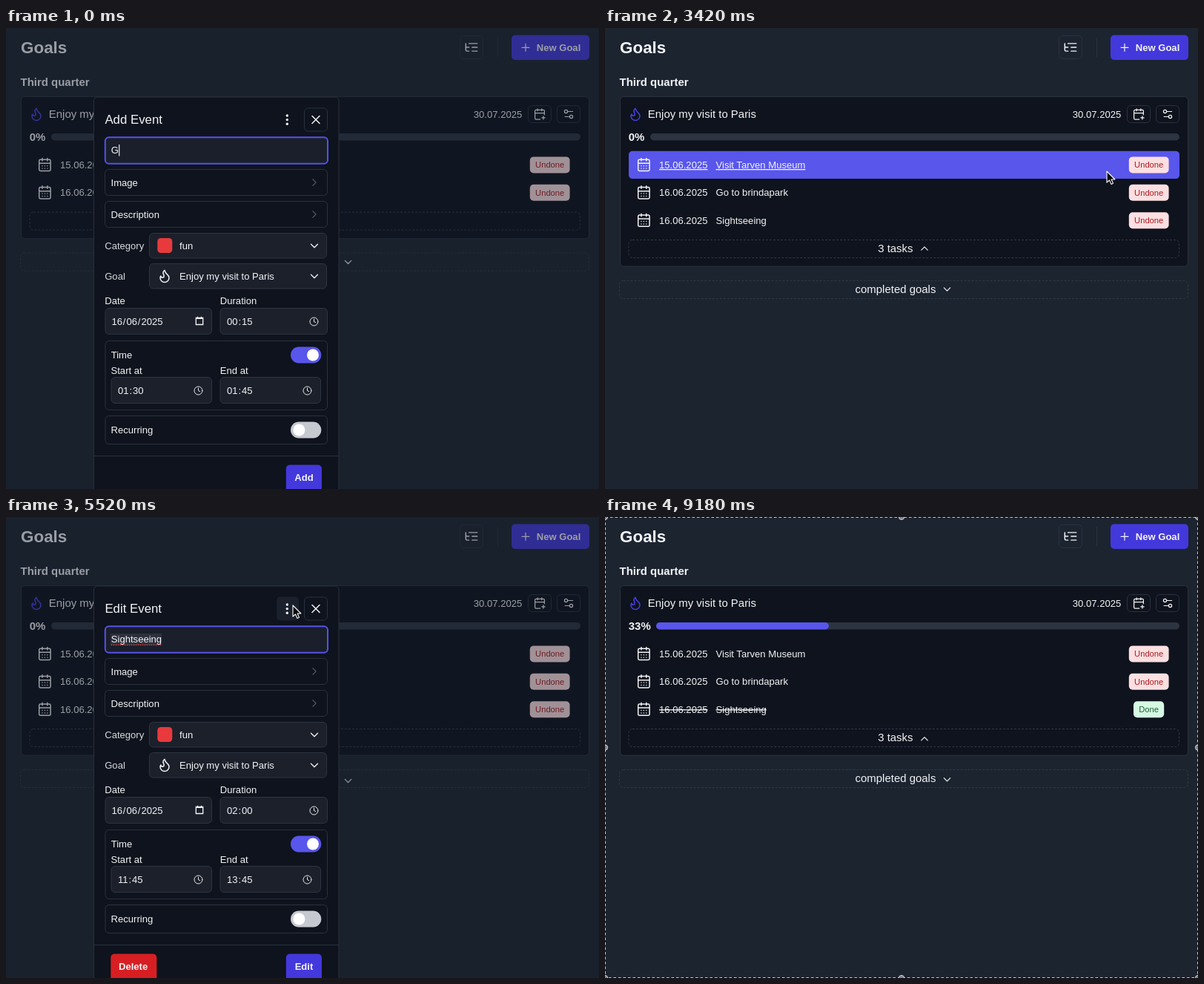
Write an HTML page that moves like this. It is 800 px wide and 621 px high and loops after 9240 ms.

```html
<!DOCTYPE html>
<html lang="en">
<head>
<meta charset="utf-8">
<title>Goals</title>
<style>
  html, body { margin: 0; width: 100%; height: 100%; overflow: hidden; background: #1c2430; }
  svg { display: block; }
  text { font: 13.08px "Liberation Sans", Arial, sans-serif; fill: #f3f4f6; white-space: pre; }
  .h1 { font-size: 22.43px; font-weight: 700; }
  .h2 { font-size: 16.82px; }
  .lg { font-size: 14.95px; }
  .sm { font-size: 11.21px; text-anchor: middle; }
  .b { font-weight: 700; }
  .mid { text-anchor: middle; }
  .soft { fill: #d6d9de; }
  .icon { fill: none; stroke: #f3f4f6; stroke-width: 1.75; stroke-linecap: round; stroke-linejoin: round; }
  .line { fill: none; stroke: #2b323e; }
  .dash { fill: none; stroke: #303845; stroke-dasharray: 3 2; }
  .field { fill: #1b202b; stroke: #2e3541; }
  .hover .label { text-decoration: underline; }
  .done .label { text-decoration: line-through; }
  .row .bg { fill: none; }
  .row.hover .bg { fill: #5856eb; }
</style>
</head>
<body>
<svg id="stage" width="800" height="621" viewBox="0 0 800 621"></svg>
<script>
const LOOP = 9240, STEP = 60, ROW = 37.4;
const INDIGO = '#5856eb', BUTTON = '#4338dc', PANEL = '#0e131d';
const TYPED = 'Go to brindapark';

const ICONS = {
  tree: 'M21 12h-8M21 6H8M21 18h-8M3 6v4c0 1.1.9 2 2 2h3M3 10v6c0 1.1.9 2 2 2h3',
  plus: 'M5 12h14M12 5v14',
  close: 'M18 6 6 18M6 6l12 12',
  flame: 'M8.5 14.5A2.5 2.5 0 0 0 11 12c0-1.38-.5-2-1-3-1.07-2.14-.22-4.05 2-6 .5 2.5 2 4.9 4 6.5s3 3.5 3 5.5a7 7 0 1 1-14 0c0-1.15.43-2.29 1-3a2.5 2.5 0 0 0 2.5 2.5z',
  calendar: 'M8 2v4M16 2v4M3 10h18M5 4h14a2 2 0 0 1 2 2v14a2 2 0 0 1-2 2H5a2 2 0 0 1-2-2V6a2 2 0 0 1 2-2zM8 14h.01M12 14h.01M16 14h.01M8 18h.01M12 18h.01M16 18h.01',
  calendarPlus: 'M8 2v4M16 2v4M21 13V6a2 2 0 0 0-2-2H5a2 2 0 0 0-2 2v14a2 2 0 0 0 2 2h8M3 10h18M16 19h6M19 16v6',
  sliders: 'M20 7h-9M14 17H5M20 17a3 3 0 1 1-6 0a3 3 0 1 1 6 0M10 7a3 3 0 1 1-6 0a3 3 0 1 1 6 0',
  up: 'm18 15-6-6-6 6',
  down: 'm6 9 6 6 6-6',
  right: 'm9 18 6-6-6-6',
  clock: 'M22 12a10 10 0 1 1-20 0a10 10 0 1 1 20 0M12 6v6l4 2'
};

// Markup helpers
const icon = (name, cx, cy, size, attrs = '') =>
  `<path class="icon" d="${ICONS[name]}" transform="translate(${cx - size / 2} ${cy - size / 2}) scale(${size / 24})" ${attrs}/>`;
const text = (x, y, str, cls = '', attrs = '') => `<text x="${x}" y="${y}" class="${cls}" ${attrs}>${str}</text>`;
const rect = (x, y, w, h, attrs = '', r = 5) => `<rect x="${x}" y="${y}" width="${w}" height="${h}" rx="${r}" ${attrs}/>`;
const box = (x, y, w, h, cls = 'line') => rect(x, y, w, h, `class="${cls}"`);
const fill = color => `fill="${color}"`;
const badge = (x, w, bg, ink, label, cls) =>
  `<g class="${cls}">${rect(x, 173.4, w, 22, fill(bg))}${text(x + w / 2, 188.3, label, 'sm', `style="fill:${ink}"`)}</g>`;

const row = (id, date, name) => `<g id="${id}" class="row">
  ${rect(32, 165.7, 743, ROW, 'class="bg"')}
  ${icon('calendar', 52.4, 184, 20.5)}
  ${text(73, 189, date, 'label')}${text(149.5, 189, name, 'label')}
  ${badge(706.8, 53.8, '#fcdfe1', '#a91c20', 'Undone', 'undone')}
  ${badge(713, 41.2, '#d5fae3', '#22603a', 'Done', 'finished')}
</g>`;

const page = `
  ${text(20, 33.7, 'Goals', 'h1')}
  ${box(612.5, 10.5, 31, 31)}${icon('tree', 628, 26, 20.5)}
  <path class="line" d="M663.5 13v26"/>
  ${rect(682, 9.5, 105, 33.5, fill(BUTTON))}${icon('plus', 701, 26.3, 17)}
  ${text(715.7, 31, 'New Goal', 'b')}
  ${text(19.6, 77.5, 'Third quarter', 'lg b')}
  <rect id="card" x="20.5" y="92.5" width="766" rx="5" fill="${PANEL}" stroke="#2b323e"/>
  ${icon('flame', 41, 116, 20.5, 'style="stroke:#4a40e4"')}
  ${text(57.8, 120.6, 'Enjoy my visit to Paris', 'lg')}
  ${text(630.8, 120.6, '30.07.2025')}
  ${box(704.5, 104.5, 31, 23)}${icon('calendarPlus', 720, 116, 17)}
  ${box(743.5, 104.5, 31, 23)}${icon('sliders', 759, 116, 16.8)}
  ${text(31.8, 151.6, '0%', 'lg b', 'id="percent"')}
  <rect id="track" y="142" height="9.4" rx="4.7" fill="#2d3441"/>
  <rect id="progress" x="69" y="142" height="9.4" rx="4.7" fill="${INDIGO}"/>
  ${row('visit', '15.06.2025', 'Visit Tarven Museum')}
  ${row('trip', '16.06.2025', TYPED)}
  ${row('sights', '16.06.2025', 'Sightseeing')}
  <g id="footer">
    ${box(32, 285.5, 742.5, 24, 'dash')}
    ${text(368.2, 302, '', 'lg', 'id="count"')}
    <g class="bounce">${icon('up', 431, 297, 16.8)}</g>
    ${box(19.5, 340.5, 767, 24, 'dash')}
    ${text(337.6, 357, 'completed goals', 'lg')}
    <g class="bounce">${icon('down', 461.5, 352, 16.8)}</g>
  </g>`;

const expander = (y, label) =>
  box(133.5, y, 300, 35) + text(141.5, y + 22.4, label) + icon('right', 416, y + 17.5, 16.8, 'style="stroke:#4d5461"');
const select = (y, label, value) =>
  text(133.2, y + 21, label, 'soft') + box(193.5, y, 239, 33.5, 'field') + text(234, y + 21, value) + icon('down', 416, y + 17, 18);
const timeField = (x, y, w, id) =>
  box(x, y, w, 35, 'field') + text(x + 9, y + 22.5, '', '', `id="${id}" dx="0 0 .9 .9"`) + icon('clock', x + w - 18, y + 18, 13.2, 'stroke-width="2.4"');
const toggle = (y, knob, color) =>
  rect(384, y, 41.3, 22, fill(color), 11) + `<circle cx="${knob}" cy="${y + 11}" r="8" fill="#fff"/>`;

const dialog = `
  <rect width="800" height="621" fill="#161d28" opacity=".4"/>
  <path d="M118.5 640V98a5 5 0 0 1 5-5H444a5 5 0 0 1 5 5V640z" fill="${PANEL}" stroke="#2b313c"/>
  ${text(133.4, 129, '', 'h2', 'id="heading"')}
  ${rect(365, 107.5, 30, 32, 'id="menu" fill="#1a212d"')}
  ${[118, 123.6, 129.2].map(y => `<circle cx="379.3" cy="${y}" r="1.7" fill="#f3f4f6"/>`).join('')}
  ${box(402.5, 108, 31, 31)}${icon('close', 418, 123.6, 20)}
  ${rect(133.8, 147.2, 300.2, 35.6, 'fill="#1a1f2b" stroke="#5552e8" stroke-width="2"')}
  <g id="selection">
    ${rect(141, 157, 69, 15.5, fill('#2c313c'), 0)}
    <path d="M142.5 172.3H210" stroke="#e0353a" stroke-width="1.8" stroke-dasharray="0 3" stroke-linecap="round"/>
  </g>
  ${text(141.8, 169.4, '', '', 'id="entry"')}
  ${rect(0, 157, 1.1, 15.5, 'id="caret" fill="#fff"', 0)}
  ${expander(190.5, 'Image')}${expander(233.5, 'Description')}
  ${select(276.5, 'Category', 'fun')}${rect(204.3, 283, 20, 20, fill('#e83a3c'), 4.5)}
  ${select(317.5, 'Goal', 'Enjoy my visit to Paris')}${icon('flame', 214, 334, 20.5)}
  ${text(133.2, 372.4, 'Date')}${text(288.8, 372.4, 'Duration')}
  ${box(134, 377.5, 143.5, 35, 'field')}
  ${text(142.4, 399.6, '16/06/2025', '', 'dx="0 0 .9 .9 0 .9 .9"')}
  <path d="M256.3 390.5h9.4v9h-9.4zM256.3 391.3h9.4M258.5 388.8v2M263.5 388.8v2" fill="none" stroke="#f3f4f6" stroke-width="1.3"/>
  ${timeField(289, 377.5, 144.5, 'duration')}
  ${box(134, 421.5, 299.5, 93)}
  ${text(141.7, 445, 'Time')}${toggle(429.5, 414, INDIGO)}
  ${text(141.5, 466, 'Start at')}${text(288.8, 466, 'End at')}
  ${timeField(142, 470.5, 135.5, 'start')}${timeField(289, 470.5, 135.5, 'end')}
  ${box(134, 522.5, 299.5, 38)}
  ${text(141.5, 546, 'Recurring')}${toggle(530.5, 395.4, '#c6c9cf')}
  <path class="line" d="M118.5 576.5H449"/>
  <g id="remove">${rect(141.3, 588.5, 62, 36, fill('#d71f23'))}${text(171.6, 609.8, 'Delete', 'b mid')}</g>
  ${rect(377.8, 588.5, 48.2, 36, fill(BUTTON))}${text(402, 609.8, '', 'b mid', 'id="submit"')}`;

const handles = [[0, 0], [400, 0], [800, 0], [0, 310.5], [800, 310.5], [0, 621], [400, 621], [800, 621]]
  .map(([x, y]) => `<circle cx="${x}" cy="${y}" r="3.6" fill="#7d828a" stroke="#d5d7da"/>`).join('');

document.getElementById('stage').innerHTML = `
  <rect width="800" height="621" fill="#1c2430"/>
  ${page}
  <g id="dialog">${dialog}</g>
  <path id="cursor" d="M0 0V15.2L3.5 12L5.9 17.4L8.5 16.3L6.1 11H10.9Z" fill="#0a0a0a" stroke="#fff" stroke-width="1.1" stroke-linejoin="round"/>
  <g id="capture"><rect x=".5" y=".5" width="799" height="620" fill="none" stroke="#c3c6ca" stroke-dasharray="3.5 3"/>${handles}</g>`;

const el = {};
document.querySelectorAll('[id]').forEach(node => el[node.id] = node);
const bouncers = document.querySelectorAll('.bounce');

// Timing helpers
const ramp = (t, from, to) => Math.min(1, Math.max(0, (t - from) / (to - from)));
const smooth = k => k * k * (3 - 2 * k);
const show = (node, on) => node.style.display = on ? '' : 'none';
const attr = (node, name, value) => node.setAttribute(name, value);

const PATH = [
  [2100, 404, 520], [2400, 404, 603], [2760, 404, 603], [3300, 677, 196], [3420, 677, 193],
  [4260, 677, 193], [4860, 667, 179], [5040, 590, 259], [5160, 590, 259], [5460, 387, 119],
  [6000, 387, 119], [6540, 407, 606], [6900, 407, 606], [7560, 733, 259], [7980, 733, 259], [8340, 780, -20]
];

function cursorAt(t) {
  const next = PATH.findIndex(p => p[0] > t);
  if (next < 1) return null;
  const [t0, x0, y0] = PATH[next - 1], [t1, x1, y1] = PATH[next];
  const k = smooth(ramp(t, t0, t1));
  return { x: x0 + (x1 - x0) * k, y: y0 + (y1 - y0) * k };
}

// cubic-bezier(.8, 0, 1, 1), solved by bisection
function fall(x) {
  let lo = 0, hi = 1;
  for (let i = 0; i < 20; i++) {
    const u = (lo + hi) / 2, v = 1 - u;
    if (2.4 * u * v * v + 3 * u * u * v + u ** 3 < x) lo = u; else hi = u;
  }
  return 3 * lo * lo * (1 - lo) + lo ** 3;
}

function drawDialog(t, cursor) {
  const opacity = t < 4000 ? 1 - ramp(t, 2700, 2820) : ramp(t, 5160, 5280) - ramp(t, 6720, 6840);
  const editing = t > 4000;
  show(el.dialog, opacity > 0);
  attr(el.dialog, 'opacity', opacity);
  el.heading.textContent = editing ? 'Edit Event' : 'Add Event';
  el.submit.textContent = editing ? 'Edit' : 'Add';
  el.duration.textContent = editing ? '02:00' : '00:15';
  el.start.textContent = editing ? '11:45' : '01:30';
  el.end.textContent = editing ? '13:45' : '01:45';
  el.entry.textContent = editing ? 'Sightseeing' : TYPED.slice(0, 1 + Math.floor(t / 96));
  show(el.remove, editing);
  show(el.selection, editing);
  show(el.menu, cursor && cursor.x > 365 && cursor.x < 395 && cursor.y > 107 && cursor.y < 139);
  const blink = t < 1440 || Math.floor((t - 1440) / 300) % 2 === 0;
  show(el.caret, !editing && blink);
  if (opacity > 0) attr(el.caret, 'x', 142 + el.entry.getComputedTextLength());
  return opacity > 0;
}

function drawPage(t, cursor, covered) {
  const added = t >= 2820, done = t >= 7800;
  const rows = added ? [el.visit, el.trip, el.sights] : [el.visit, el.sights];
  show(el.trip, added);
  rows.forEach((node, i) => {
    const top = 165.7 + ROW * i;
    const hovered = cursor && !covered && cursor.x > 32 && cursor.x < 775 && cursor.y >= top && cursor.y < top + ROW;
    attr(node, 'transform', `translate(0 ${ROW * i})`);
    node.classList.toggle('hover', !!hovered);
    const finished = done && node === el.sights;
    node.classList.toggle('done', finished);
    show(node.querySelector('.undone'), !finished);
    show(node.querySelector('.finished'), finished);
  });
  attr(el.card, 'height', added ? 228.6 : 228.6 - ROW);
  attr(el.footer, 'transform', `translate(0 ${added ? 0 : -ROW})`);
  el.count.textContent = `${rows.length} tasks`;

  el.percent.textContent = done ? '33%' : '0%';
  const left = done ? 69 : 61;
  attr(el.track, 'x', left);
  attr(el.track, 'width', 775 - left);
  attr(el.progress, 'width', 233 * smooth(ramp(t, 7800, 7980)));

  const phase = ((t - 120) / 600 + 1) % 1;
  const drop = 3.5 * fall(1 - 2 * Math.min(phase, 1 - phase));
  bouncers.forEach(node => attr(node, 'transform', `translate(0 ${drop})`));
}

function draw(now) {
  const t = Math.floor((now % LOOP) / STEP) * STEP;
  const cursor = cursorAt(t);
  drawPage(t, cursor, drawDialog(t, cursor));
  show(el.cursor, cursor);
  if (cursor) attr(el.cursor, 'transform', `translate(${cursor.x} ${cursor.y})`);
  show(el.capture, t >= 8400);
}

const begin = performance.now();
function tick() {
  draw(performance.now() - begin);
  requestAnimationFrame(tick);
}
tick();
</script>
</body>
</html>
```
